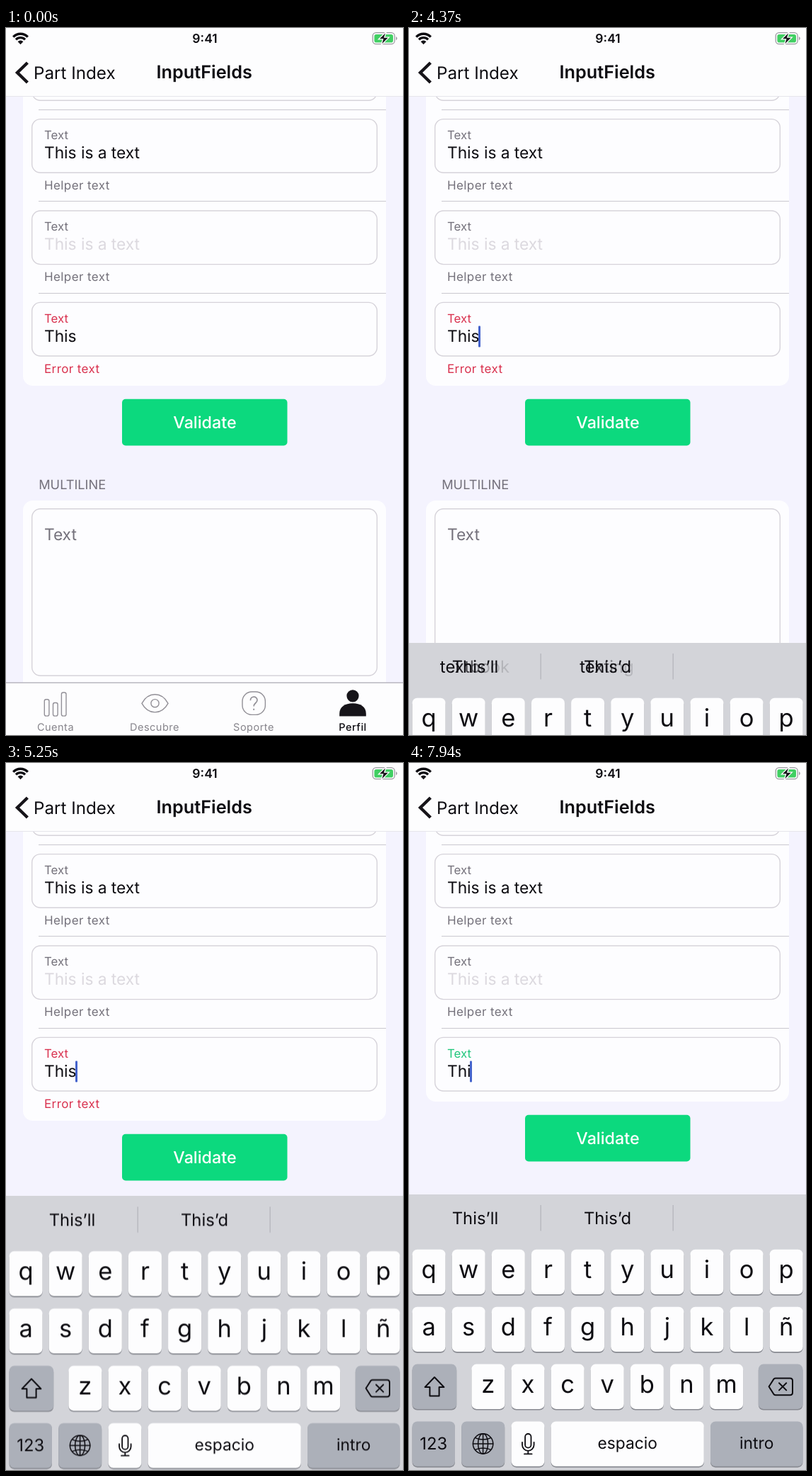
These frames come from a looping animation (561x998 px, 8 s). An HTML page:

```html
<!DOCTYPE html>
<html lang="en">
<head>
<meta charset="utf-8">
<title>Input fields</title>
<style>
html, body { margin: 0; width: 100%; height: 100%; overflow: hidden; background: #f4f3fe; }
svg { display: block; width: 100vw; height: 100vh; }
text { font-family: Inter, Roboto, sans-serif; fill: #0d0c11; white-space: pre; }
.mid { text-anchor: middle; }
.label { font-size: 16.8px; fill: #74717b; }
.note { font-size: 17px; fill: #74717b; letter-spacing: .4px; }
.value { font-size: 22.8px; letter-spacing: -.05px; }
.off { fill: #dcd9df; }
.gray { fill: #74717b; }
.red { fill: #d9314e; }
.card { fill: #fdfdff; }
.bar { fill: #fdfdfe; }
.box { fill: none; stroke: #d6d3da; stroke-width: 1.4; }
.rule { stroke: #cac8cf; }
.tab { font-size: 14.5px; letter-spacing: .5px; fill: #86848b; }
.icon { fill: none; stroke: #929097; stroke-width: 1.4; }
.dark { fill: #161419; }
.key { fill: #fdfdfe; }
.soft { fill: #acb0b9; }
.shade { fill: #888a91; }
.glyph { font-size: 34.5px; }
.word { font-size: 22.8px; }
.digits { font-size: 23.8px; }
.hint { font-size: 23.8px; }
.line { fill: none; stroke: #0d0c11; stroke-width: 2; stroke-linejoin: round; stroke-linecap: round; }

.rise, .fade-old, .fade-new, .collapse, .caret, .caret-x, .before, .after {
  animation: 8s linear infinite;
}
.rise { animation-name: rise; }
.fade-old { animation-name: fade-old; }
.fade-new { animation-name: fade-new; }
.collapse { animation-name: collapse; }
.caret { animation-name: blink; fill: #4463cc; }
.caret-x { animation-name: step-back; }
.before { animation-name: before; }
.after { animation-name: after; }

@keyframes rise {
  0% { transform: translateY(391px); }
  52.25% { transform: translateY(389px); animation-timing-function: cubic-bezier(.333, 0, .667, .496); }
  54.625% { transform: translateY(260px); animation-timing-function: cubic-bezier(.333, .516, .667, .854); }
  58.625% { transform: translateY(48.7px); animation-timing-function: cubic-bezier(.333, 1.05, .667, .96); }
  65.625% { transform: translateY(2.4px); animation-timing-function: ease-out; }
  72.5%, 100% { transform: none; }
}
@keyframes fade-old {
  0%, 54.625% { opacity: 1; }
  56.5%, 100% { opacity: 0; }
}
@keyframes fade-new {
  0%, 52.25% { opacity: 0; }
  54.3%, 100% { opacity: 1; }
}
@keyframes blink {
  0%, 52.24% { opacity: 0; }
  52.25%, 69.5% { opacity: 1; }
  73.375%, 82.25% { opacity: 0; }
  86.25%, 100% { opacity: 1; }
}
@keyframes step-back {
  0%, 93.49% { transform: none; }
  93.5%, 100% { transform: translateX(-12px); }
}
@keyframes before {
  0%, 93.49% { opacity: 1; }
  93.5%, 100% { opacity: 0; }
}
@keyframes after {
  0%, 93.49% { opacity: 0; }
  93.5%, 100% { opacity: 1; }
}
@keyframes collapse {
  0%, 93.5% { transform: none; animation-timing-function: ease-in-out; }
  98.25%, 100% { transform: translateY(-27px); }
}
</style>
</head>
<body>
<svg viewBox="0 0 561 998" text-rendering="geometricPrecision">
  <defs>
    <linearGradient id="wipe">
      <stop offset=".25" stop-color="#0d0c11"/>
      <stop offset=".7" stop-color="#0d0c11" stop-opacity=".25"/>
      <stop offset="1" stop-color="#0d0c11" stop-opacity=".12"/>
    </linearGradient>
  </defs>
  <rect width="561" height="998" fill="#f4f3fe"/>

  <!-- form -->
  <g class="collapse">
    <rect class="card" x="24" y="40" width="513" height="465" rx="14"/>
    <rect x="164" y="523.8" width="233.5" height="65.7" rx="5" fill="#0cd97e"/>
    <text class="mid" x="281" y="565" font-size="23.3" font-weight="500" style="fill:#fff">Validate</text>
    <text class="gray" x="46.2" y="651" font-size="18.2">MULTILINE</text>
    <rect class="card" x="24" y="667" width="513" height="400" rx="14"/>
    <rect class="box" x="36.7" y="678.7" width="487.6" height="235.6" rx="12"/>
    <text class="value gray" x="54" y="723">Text</text>
  </g>
  <g id="fields"></g>
  <text class="value before" x="54" y="443">This</text>
  <text class="value after" x="54" y="443">Thi</text>
  <text class="label red before" x="54" y="416">Text</text>
  <text class="label after" x="54" y="416" style="fill:#1fc67b">Text</text>
  <text class="note red before" x="54" y="487">Error text</text>
  <g class="caret-x"><rect class="caret" x="98" y="420.5" width="3" height="30" rx="1"/></g>

  <!-- header -->
  <rect class="bar" width="561" height="96"/>
  <path d="M0 96.5H561" stroke="#e6e5eb"/>
  <g fill="none" stroke="#0d0c11" stroke-width="3.3">
    <path d="M10.2 12.6A14.4 14.4 0 0 1 30.8 12.6"/>
    <path d="M14 16.4A9 9 0 0 1 27 16.4"/>
  </g>
  <path class="dark" d="M20.5 23.2L16.6 19.2A5.6 5.6 0 0 1 24.4 19.2Z"/>
  <text class="mid" x="281" y="20.8" font-size="17.5" font-weight="600">9:41</text>
  <rect x="518.2" y="6.7" width="31" height="16" rx="4.6" fill="none" stroke="#9b9aa0" stroke-width="1.3"/>
  <path d="M551 12Q554.6 14.7 551 17.5Z" fill="#9b9aa0"/>
  <rect x="520.4" y="8.9" width="26.6" height="11.6" rx="2.8" fill="#41cf63"/>
  <path d="M537.5 5L526.5 15.8H532.6L530 24.4L541.2 13.2H534.8Z" class="dark" stroke="#fdfdfe" stroke-width="1.3"/>
  <path d="M30.4 49L16 63L30.4 77" fill="none" stroke="#161419" stroke-width="4.4"/>
  <text x="39" y="71.5" font-size="24.2">Part Index</text>
  <text class="mid" x="280.2" y="71.3" font-size="25.3" font-weight="600">InputFields</text>

  <!-- tab bar -->
  <rect class="bar" y="924" width="561" height="74"/>
  <path d="M0 924.3H561" stroke="#b9b7bf" stroke-width="1.4"/>
  <g class="icon">
    <rect x="54.3" y="947.7" width="6.6" height="23.4" rx="2.4"/>
    <rect x="66.5" y="952.5" width="6.6" height="18.6" rx="2.4"/>
    <rect x="78.4" y="938" width="6.6" height="33.1" rx="2.4"/>
    <path d="M192 953.3C201 936.5 220 936.5 229 953.3C220 970 201 970 192 953.3Z"/>
    <circle cx="210.5" cy="953.2" r="5.6"/>
    <rect x="334" y="937" width="32.4" height="32.4" rx="13.5"/>
    <path d="M345.4 949.2C345.4 942.5 355 942.6 355 948.8C355 953 350.2 952.6 350.2 957.6M350.2 960.8V963" stroke-width="1.7"/>
  </g>
  <circle class="dark" cx="490" cy="942.8" r="8.6"/>
  <path class="dark" d="M471.2 971.5V968C471.2 958 479 953.2 490 953.2S508.8 958 508.8 968V971.5Z"/>
  <g class="mid">
    <text class="tab" x="70" y="992">Cuenta</text>
    <text class="tab" x="210" y="992">Descubre</text>
    <text class="tab" x="350" y="992">Soporte</text>
    <text class="tab" x="490" y="992" font-weight="500" style="fill:#0d0c11">Perfil</text>
  </g>

  <!-- keyboard -->
  <g class="rise">
    <g transform="translate(0 609)">
      <rect width="561" height="400" fill="#d3d4d9"/>
      <path d="M186.2 15V51.5M373.2 15V51.5" stroke="#b4b5bc" stroke-width="1.3"/>
      <g class="mid fade-old">
        <text class="hint" x="93" y="42" style="fill:url(#wipe)">textbook</text>
        <text class="hint" x="279.5" y="42" style="fill:url(#wipe)">texting</text>
      </g>
      <g class="mid fade-new">
        <text class="hint" x="93.5" y="42">This’ll</text>
        <text class="hint" x="280.5" y="42">This’d</text>
      </g>
      <g id="keys"></g>
      <g class="line">
        <path d="M36 258L49.4 272H42.6V284.4H29.4V272H22.6Z"/>
        <path d="M518 259.4H538.5Q542 259.4 542 263V279.5Q542 283.2 538.5 283.2H518Q516.6 283.2 515.6 282.2L508.6 271.3L515.6 260.4Q516.6 259.4 518 259.4Z"/>
        <path d="M523 266.2L533.2 276.4M533.2 266.2L523 276.4"/>
        <g stroke-width="1.5">
          <circle cx="104.6" cy="352" r="14.2"/>
          <ellipse cx="104.6" cy="352" rx="7" ry="14.2"/>
          <path d="M104.6 338V366M90.4 352H118.8M93.6 343.6Q104.6 348.6 115.6 343.6M93.6 360.4Q104.6 355.4 115.6 360.4"/>
        </g>
        <g stroke-width="1.8">
          <rect x="164.1" y="338" width="8.4" height="19.6" rx="4.2"/>
          <path d="M160 350V353.5A8.3 8.3 0 0 0 176.6 353.5V350M168.3 362V366.4M163 366.4H173.6"/>
        </g>
      </g>
    </g>
  </g>
</svg>
<script>
const put = (id, markup) => { document.getElementById(id).innerHTML = markup; };

const box = (y) => `<rect class="box" x="36.7" y="${y}" width="487.6" height="75.6" rx="12"/>`;
const rule = (y) => `<path class="rule" d="M46 ${y}H537"/>`;

// Rows with helper text repeat every 129.4 px.
const rowY = (i) => 128.6 + i * 129.4;
const helperRow = (y, tone) => box(y) + rule(Math.floor(y + 116) + .5) +
  `<text class="label" x="54" y="${y + 28.4}">Text</text>
   <text class="value ${tone}" x="54" y="${y + 55.4}">This is a text</text>
   <text class="note" x="54" y="${y + 99.4}">Helper text</text>`;

put('fields', box(26.6) + rule(115.5) +
  helperRow(rowY(0), '') + helperRow(rowY(1), 'off') + box(rowY(2)));

const key = (x, y, w, text = '', tone = 'key', font = 'glyph', base = 40) =>
  `<rect class="shade" x="${x}" y="${y + 2}" width="${w}" height="63" rx="7"/>
   <rect class="${tone}" x="${x}" y="${y}" width="${w}" height="63.3" rx="7"/>
   <text class="mid ${font}" x="${x + w / 2}" y="${y + base}">${text}</text>`;

const row = (letters, x, y) =>
  [...letters].map((c, i) => key(x + i * 56.12, y, 47, c)).join('');

put('keys',
  row('qwertyuiop', 4.6, 77.7) +
  row('asdfghjklñ', 4.6, 158.7) +
  key(4.6, 239.6, 62.6, '', 'soft') +
  row('zxcvbnm', 88.4, 239.6) +
  key(493.8, 239.6, 62.6, '', 'soft') +
  key(4.6, 320.4, 60.4, '123', 'soft', 'digits', 39.8) +
  key(74.2, 320.4, 61, '', 'soft') +
  key(144.6, 320.4, 46.8) +
  key(200.6, 320.4, 216.2, 'espacio', 'key', 'word', 38.2) +
  key(426, 320.4, 130.4, 'intro', 'soft', 'word', 38.2));
</script>
</body>
</html>
```
